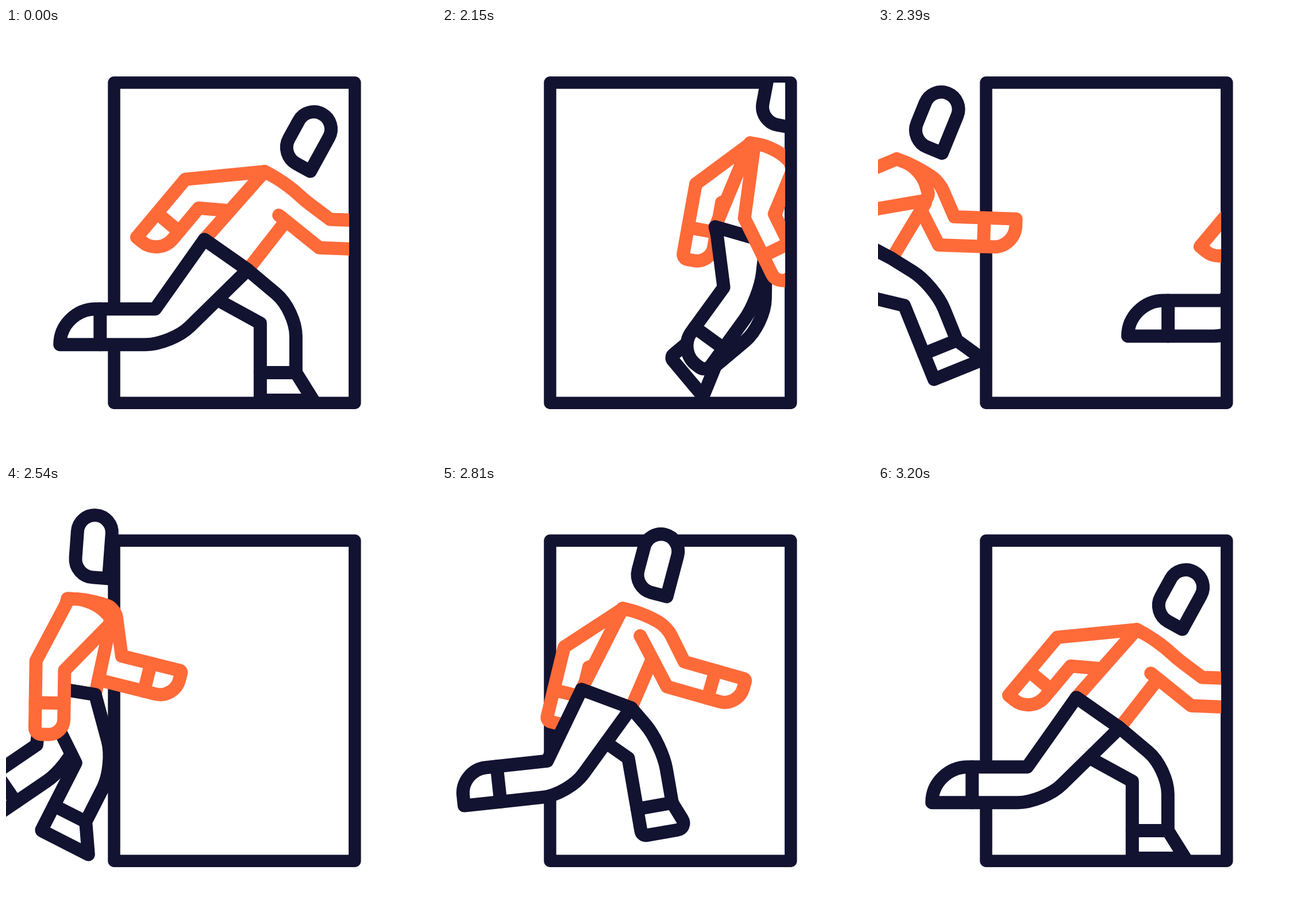
Write an HTML page with a canvas that moves like this. It is 748x748 px and loops after 3230 ms.

```html
<!DOCTYPE html>
<html lang="en">
<head>
<meta charset="utf-8">
<title>Runner through a doorway</title>
<style>
  html, body { margin: 0; height: 100%; overflow: hidden; background: #fff; }
  canvas { display: block; width: 100vw; height: 100vh; }
</style>
</head>
<body>
<canvas id="stage" width="748" height="748"></canvas>
<script>
const ctx = document.getElementById('stage').getContext('2d');
const NAVY = '#121331', ORANGE = '#ff6a39';
const LOOP = 3230, START = 2000, RUN = 1200, TICK = 30, STRIDE = 740;
const FIRST_STEP = 390, SECOND_STEP = 570, DIP = 150;
const HIP = { x: 0, y: 0 };

const clamp = v => Math.min(1, Math.max(0, v));
const lerp = (a, b, k) => a + (b - a) * k;
const smooth = v => { const k = clamp(v); return k * k * (3 - 2 * k); };
const hump = v => Math.sin(Math.PI * v);
const radians = deg => deg * Math.PI / 180;
const mix = (a, b, k) => ({ x: lerp(a.x, b.x, k), y: lerp(a.y, b.y, k) });
const round = (p, r) => ({ ...p, r });

// Angles hang down from zero and turn forward.
const ray = (p, deg, length) => ({
  x: p.x + Math.sin(radians(deg)) * length,
  y: p.y + Math.cos(radians(deg)) * length
});

function toward(p, q) {
  const d = Math.hypot(q.x - p.x, q.y - p.y) || 1;
  return mix(p, q, Math.min(p.r / d, p.r / (p.r + (q.r || 0))));
}

function paint(color) {
  ctx.fill();
  ctx.strokeStyle = color;
  ctx.stroke();
}

function shape(points, color, closed) {
  ctx.beginPath();
  points.forEach((p, i) => {
    if (!p.r) return ctx.lineTo(p.x, p.y);
    const a = toward(p, points[i - 1]), b = toward(p, points[(i + 1) % points.length]);
    const c = mix(a, p, .55), d = mix(b, p, .55);
    ctx.lineTo(a.x, a.y);
    ctx.bezierCurveTo(c.x, c.y, d.x, d.y, b.x, b.y);
  });
  if (closed) ctx.closePath();
  paint(color);
}

// Lower half of a limb: its mitred joint corners, and any point along and across it.
function lowerLimb(joint, upper, lower, half) {
  const at = (along, across) => ray(ray(joint, lower, along), lower + 90, across);
  const skew = half * Math.tan(radians(upper - lower) / 2);
  return { at, back: at(skew, -half), front: at(-skew, half) };
}

// trail: 0 reaches ahead, 1 is stretched out behind
function drawLeg(trail, swinging, dip, waist) {
  const half = 31;
  const thigh = lerp(46 - 6 * dip, -41, trail);
  const thighLength = lerp(123 + 18 * dip, 166, trail) - (swinging ? 43 * hump(trail) : 0);
  const shin = lerp(22 - 22 * dip, -90, trail) - (swinging ? 0 : 18 * hump(trail));
  const end = 145 + 35 * trail ** 4, ankle = end - 48 - 22 * trail ** 3;
  const toe = 30 * clamp(((swinging ? .3 : .75) - trail) / .3);
  const heelRound = swinging ? Math.min(63, 80 * trail) : 63 * trail ** 3;
  const toeRound = swinging ? 250 * trail * (1 - trail) ** 3 : 0;

  const knee = ray(mix(HIP, waist, .5), thigh, thighLength);
  const { at, back, front } = lowerLimb(knee, thigh, shin, half);
  const seat = mix(HIP, { x: 25, y: 106 }, (1 - trail) ** 3);
  shape([HIP, seat, back, round(at(end, -half), heelRound),
    round(at(end, half + toe), toeRound), at(ankle, half), round(front, 45), waist], NAVY, true);
  shape([at(ankle, -half), at(ankle, half)], NAVY);
}

// ahead: 0 is swung behind, 1 reaches ahead
function drawArm(ahead, lag, onBody) {
  const half = 25, end = 120, cuff = 65;
  const upper = lerp(-74, 50, ahead) - lag, lower = lerp(-40, 88, ahead);
  const length = lerp(148, 108, ahead) - 28 * hump(ahead);
  const elbow = ray(onBody(58, -138), upper, length);
  const { at, back, front } = lowerLimb(elbow, upper, lower, half);
  const shoulder = onBody(18, -157);
  shape([shoulder, round(onBody(62, -162), 28), round(onBody(103, -122 - 34 * ahead), 15), front,
    round(at(end, half), 38 * (1 - ahead)), round(at(end, -half), 38 * ahead), back,
    mix(shoulder, onBody(82, -109), ahead ** 3)], ORANGE);
  shape([at(cuff, half), at(cuff, -half)], ORANGE);
}

function drawHead(chin, angle, height) {
  ctx.save();
  ctx.translate(chin.x, chin.y);
  ctx.rotate(radians(angle));
  ctx.beginPath();
  ctx.moveTo(0, 0);
  ctx.lineTo(0, -height);
  ctx.arc(-30, -height, 30, 0, Math.PI, true);
  ctx.lineTo(-60, -32);
  ctx.arcTo(-60, 0, -28, 0, 32);
  ctx.closePath();
  paint(NAVY);
  ctx.restore();
}

// Even speed at first, coming to rest at the end.
function travel(s) {
  return s * (1.39 + .22 * s - .61 * s * s) + .5 * s ** 4 * (1 - s) ** 2;
}

function drawRunner(t, shift, top) {
  const second = t >= FIRST_STEP;
  const time = second ? (t - FIRST_STEP) / SECOND_STEP : t / FIRST_STEP;
  const step = smooth(clamp(time) ** .75);
  const landed = FIRST_STEP + SECOND_STEP;
  const dip = 1 - smooth(t / DIP) + smooth((t - landed) / (RUN - landed));
  const tilt = 28 + 7 * dip - (second ? 23 : 12) * hump(step);
  const cos = Math.cos(radians(tilt)), sin = Math.sin(radians(tilt));
  const onBody = (x, y) => ({ x: x * cos - y * sin, y: x * sin + y * cos });
  const swap = k => second ? k : 1 - k;
  const nearTrail = swap(step), farAhead = 1 - swap(step * step);
  const waist = onBody(92, 0);

  ctx.save();
  ctx.beginPath();
  ctx.rect(0, top, 597, 748);
  ctx.clip();
  ctx.translate(shift - 395 + STRIDE * travel(t / RUN), 358 + 10 * dip - 12 * hump(step));
  ctx.lineWidth = 23;
  drawArm(farAhead, 16, onBody);
  shape([HIP, onBody(18, -157), round(onBody(62, -162), 28), onBody(98, -113), waist],
    ORANGE, true);
  ctx.fillStyle = 'transparent';
  drawLeg(1 - nearTrail, second, dip, waist);
  ctx.fillStyle = '#fff';
  drawLeg(nearTrail, !second, dip, waist);
  drawArm(nearTrail, 0, onBody);
  drawHead(onBody(83, -203), .95 * tilt - 4.5, 82 - .42 * tilt);
  ctx.restore();
}

function draw(now) {
  const elapsed = Math.max(0, now % LOOP - START);
  const t = Math.min(RUN, Math.floor(elapsed / TICK) * TICK);
  ctx.fillStyle = '#fff';
  ctx.fillRect(0, 0, 748, 748);
  ctx.lineJoin = ctx.lineCap = 'round';
  ctx.lineWidth = 21.5;
  ctx.strokeStyle = NAVY;
  ctx.strokeRect(188, 95, 418.75, 557.25);
  drawRunner(t, STRIDE, 95);
  drawRunner(t, 0, 0);
  requestAnimationFrame(draw);
}
requestAnimationFrame(draw);
</script>
</body>
</html>
```
